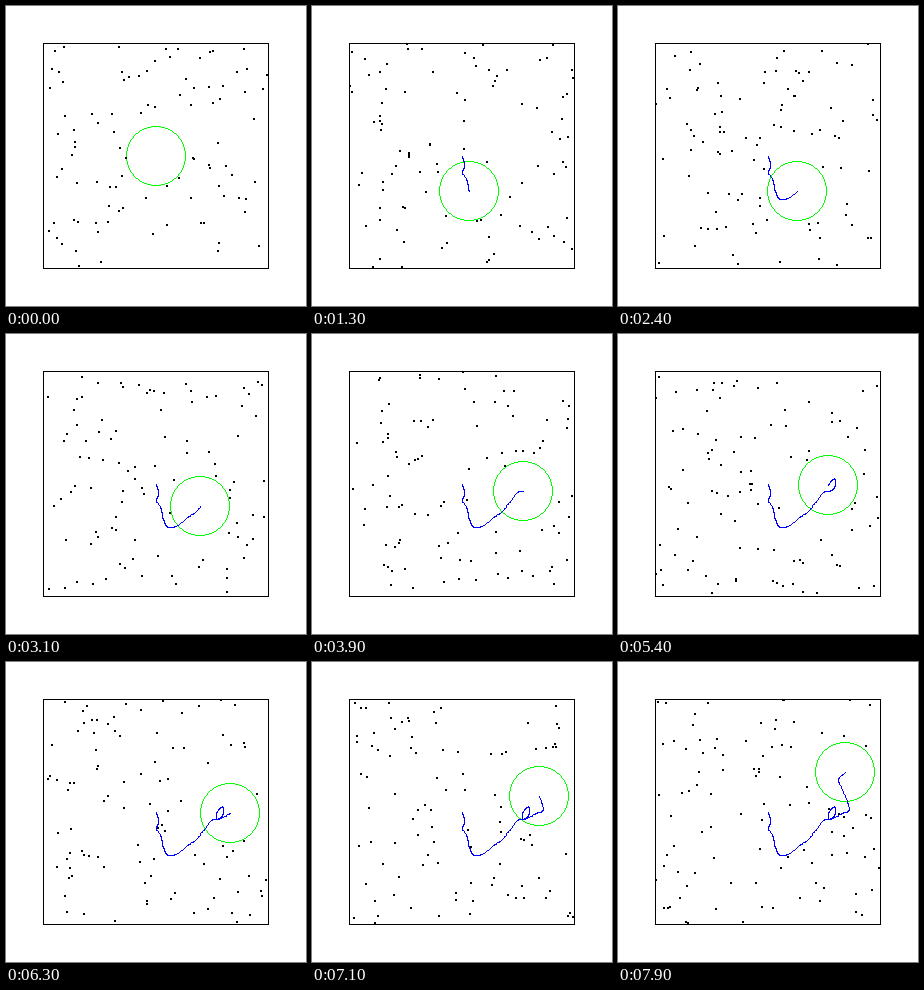
Animation, 300 px wide and 300 px high, one loop 8 s. Source, as a matplotlib script:

```python
import numpy as np
import matplotlib.pyplot as plt
from matplotlib.animation import FuncAnimation

SIZE, FRAMES, STEP = 300, 80, 100
LO, HI = 37, 262            # box lines
RADIUS, COUNT, SPEED, SUB = 30, 96, 5.0, 10
BLACK, GREEN, BLUE = (0, 0, 0), (0, 255, 0), (0, 0, 255)

# Key points of the disc's walk: time step, x, y
KEYS = np.array([
    (0, 150, 150), (3, 152, 160), (5, 149.6, 165), (8, 154, 172),
    (13, 157, 185), (16, 160, 192), (19, 167, 193), (24, 179, 185),
    (29, 190, 177), (37, 207, 157), (39, 211, 157), (43, 216, 153),
    (47, 217, 145), (54, 210, 151), (57, 210, 157), (63, 224, 151),
    (67, 231, 148), (76, 221, 115), (79, 227, 110)], float)


def smooth_path(keys, t):
    """Cubic Hermite curve through timed key points."""
    time, pts = keys[:, 0], keys[:, 1:]
    slope = np.gradient(pts, time, axis=0)
    i = np.clip(np.searchsorted(time, t, side="right") - 1, 0, len(time) - 2)
    h = (time[i + 1] - time[i])[:, None]
    u = (t - time[i])[:, None] / h
    ease = u * u * (3 - 2 * u)
    return (pts[i] * (1 - ease) + pts[i + 1] * ease
            + h * u * (1 - u) * (slope[i] * (1 - u) - slope[i + 1] * u))


def simulate(disc):
    """Gas of point particles bouncing off the walls and the moving disc."""
    rng = np.random.default_rng(11)
    pos = rng.uniform(LO, HI - 1, (4 * COUNT, 2))
    pos = pos[np.hypot(*(pos - disc[0]).T) > RADIUS][:COUNT]
    vel = rng.normal(0, SPEED, pos.shape)
    states = [pos.copy()]
    for start, end in zip(disc, disc[1:]):
        drift = end - start
        for s in range(1, SUB + 1):
            pos += vel / SUB
            off = pos - (start + drift * s / SUB)
            dist = np.hypot(*off.T)
            normal = off / np.maximum(dist, 1e-6)[:, None]
            inside = dist < RADIUS
            pos[inside] += (normal * (RADIUS - dist)[:, None])[inside]
            closing = ((vel - drift) * normal).sum(1)
            hit = inside & (closing < 0)
            vel[hit] -= 2 * closing[hit, None] * normal[hit]
            vel = np.where(pos < LO, abs(vel), vel)
            vel = np.where(pos > HI - 1, -abs(vel), vel)
            pos = np.clip(pos, LO, HI - 1)
        states.append(pos.copy())
    return states


def plot_pixels(img, x, y, color):
    img[np.rint(y).astype(int), np.rint(x).astype(int)] = color


def draw_line(img, a, b, color):
    n = int(max(abs(b - a))) + 1
    plot_pixels(img, np.linspace(a[0], b[0], n + 1),
                np.linspace(a[1], b[1], n + 1), color)


def draw_circle(img, center, r, color):
    """One-pixel ring, 2r pixels wide, centred on a pixel corner."""
    cx, cy = center - 0.5
    r -= 0.5
    half = int(r * 0.7072) + 0.5
    u = np.arange(-half, half + 1)
    v = np.floor(np.sqrt(r * r - u * u)) + 0.5
    for sign in (-1, 1):
        plot_pixels(img, cx + u, cy + sign * v, color)
        plot_pixels(img, cx + sign * v, cy + u, color)


def render(n):
    img = np.full((SIZE, SIZE, 3), 255, np.uint8)
    img[[LO, HI], LO:HI + 1] = BLACK
    img[LO:HI + 1, [LO, HI]] = BLACK
    draw_circle(img, trail[n], RADIUS, GREEN)
    for a, b in zip(trail[:n], trail[1:n + 1]):
        draw_line(img, a, b, BLUE)
    for x, y in np.rint(gas[n]).astype(int):
        img[y - 1:y + 1, x - 1:x + 1] = BLACK
    return img


walk = smooth_path(KEYS, np.arange(FRAMES))
trail = np.rint(walk)
gas = simulate(walk)

fig = plt.figure(figsize=(3, 3), dpi=100)
ax = fig.add_axes([0, 0, 1, 1])
ax.axis("off")
view = ax.imshow(render(0), interpolation="nearest", aspect="auto")


def update(n):
    view.set_data(render(n))
    return [view]


anim = FuncAnimation(fig, update, frames=FRAMES, interval=STEP,
                     repeat=True, repeat_delay=0)
plt.show()
```
